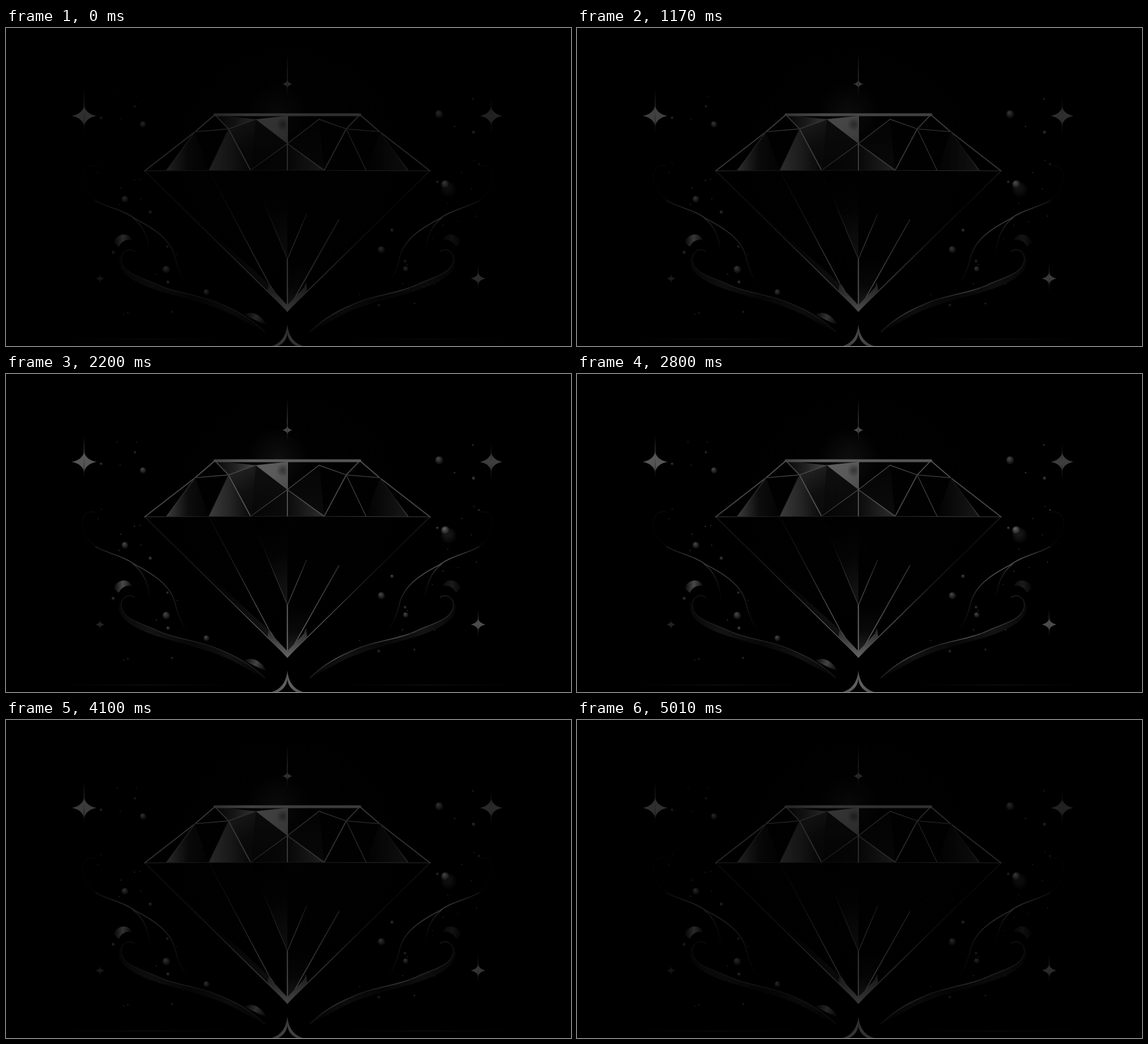
Animation of 998x561 px, one loop 5170 ms. Source, as an HTML page with a canvas:

```html
<!DOCTYPE html>
<html>
<head>
<meta charset="utf-8">
<style>
html, body { margin: 0; width: 100%; height: 100%; overflow: hidden; background: #000; }
canvas { display: block; }
</style>
</head>
<body>
<canvas id="stage" width="998" height="561"></canvas>
<script>
const W = 998, H = 561, AXIS = 497, LOOP = 5170, FADE = 5010;
const view = document.getElementById('stage').getContext('2d');
const art = document.createElement('canvas');
art.width = W;
art.height = H;
const c = art.getContext('2d');

// Gem corners as distance from the axis and height:
// lower-case letters lie left of the axis, upper-case letters right of it.
const corners = {
  a: [128, 153], b: [104, 178], c: [163, 183], d: [56, 161],
  e: [65, 251], f: [139, 251], g: [213, 251], t: [252, 252],
  o: [0, 155], h: [0, 204], p: [0, 251],
  k: [0, 408], m: [32, 452], n: [91, 338], r: [34, 328], q: [0, 499]
};

function corner(ch) {
  const key = ch.toLowerCase();
  const [dx, y] = corners[key];
  return [AXIS + (ch === key ? -dx : dx), y];
}

const gray = (v, a = 1) => `rgba(${v},${v},${v},${a})`;

function ramp([x1, y1], [x2, y2], tones) {
  const g = c.createLinearGradient(x1, y1, x2, y2);
  tones.forEach((v, i) => g.addColorStop(i / (tones.length - 1), gray(v)));
  return g;
}

function trace(names) {
  c.beginPath();
  for (const ch of names) c.lineTo(...corner(ch));
}

// Shades run from the first named corner towards the last
function facet(names, ...tones) {
  trace(names);
  c.closePath();
  c.fillStyle = ramp(corner(names[0]), corner(names.at(-1)), tones);
  c.fill();
}

function edge(names, width, ...tones) {
  trace(names);
  c.strokeStyle = ramp(corner(names[0]), corner(names.at(-1)), [...tones, tones.at(-1)]);
  c.lineWidth = width;
  c.stroke();
}

function glow(x, y, r, v, a) {
  const g = c.createRadialGradient(x, y, 0, x, y, r);
  g.addColorStop(0, gray(v, a));
  g.addColorStop(1, gray(v, 0));
  c.fillStyle = g;
  c.fillRect(x - r, y - r, r * 2, r * 2);
}

function mirrored(draw) {
  for (const right of [false, true]) {
    c.save();
    if (right) {
      c.translate(AXIS * 2, 0);
      c.scale(-1, 1);
    }
    draw(right);
    c.restore();
  }
}

function crown() {
  facet('gcf', 60, 14, 4);
  facet('fbe', 60, 38, 10);
  facet('dba', 74, 34, 8);
  facet('bde', 34, 16, 10);
  facet('dhe', 16, 8);
  facet('Ehe', 46, 12, 6);
  facet('DhE', 6, 12);
  facet('GCF', 24, 3);
  facet('doh', 96, 92, 78);
  glow(AXIS - 8, 170, 12, 20, 0.5);

  facet('aoA', 68, 98, 84);
  edge('aA', 5, 70, 98, 94, 88);
  for (const side of ['act', 'ACT']) edge(side, 1.8, 86, 74);
  edge('abe', 1.8, 74, 84);
  edge('ABE', 1.8, 86, 72);
  edge('cbd', 1.4, 56, 72);
  edge('DBC', 1.4, 70, 56);
  edge('gc', 1.5, 66, 44);
  edge('GC', 1.3, 66, 24);
  edge('BF', 1.3, 60, 66);
  edge('bf', 1, 34, 24);
  edge('ehD', 1.3, 48, 76);
  edge('hE', 1.6, 60, 80);
  edge('de', 1, 30, 16);
  edge('op', 2, 96, 80);
  edge('tpT', 1.2, 64, 34, 30, 34, 64);
}

function pavilion() {
  facet('tmq', 2, 4, 26);
  facet('kpe', 24, 5, 0);
  facet('qNk', 40, 10, 2);
  edge('tq', 1.3, 28, 24, 44, 92);
  edge('Tq', 1.3, 34, 16, 36, 92);
  edge('fmq', 1.4, 8, 32, 90);
  edge('ek', 1, 2, 8, 64);
  edge('rk'.replace('r', 'R'), 1.3, 34, 74);
  edge('Nq', 1.6, 50, 64, 90);
  edge('kq', 2.2, 84, 94);

  // Bright point of the gem
  c.fillStyle = ramp([AXIS, 450], [AXIS, 500], [40, 72, 102]);
  mirrored(() => {
    c.fill(new Path2D('M464 448L468 458L497 489V501L462 463Z'));
  });
}

function vines() {
  mirrored(right => {
    const lit = right ? 78 : 56;
    const stroke = (d, width, from, to, ...tones) => {
      c.strokeStyle = ramp(from, to, tones);
      c.lineWidth = width;
      c.stroke(new Path2D(d));
    };
    stroke('M158 244C143 239 133 252 135 266Q138 294 165 307', 1, [140, 240], [150, 307], 20, 4, 18);
    stroke('M158 305C187 319 207 321 229 337C266 356 294 376 300 410Q306 433 318 450',
      1.8, [158, 305], [318, 450], 24, lit, lit, 30, 3);
    stroke('M224 335Q250 354 254 396', 1.4, [224, 335], [254, 396], lit, 30, 3);

    const top = 'M227 394C215 386 202 396 204 411C208 434 240 440 264 451C300 469 345 470 384 489C420 504 440 520 457 536';
    c.fillStyle = ramp([205, 400], [457, 536], [8, 20, 8, 18, 5]);
    c.fill(new Path2D(top + 'Q428 522 400 506C360 486 310 476 268 463C224 449 196 430 200 408Q207 386 227 394Z'));
    stroke(top, right ? 1.8 : 1.2, [205, 400], [457, 536], 24, lit * 0.65, lit, 38, lit, 26);

    c.fillStyle = ramp([190, 375], [223, 375], right ? [5, 28, 12] : [6, 76, 10]);
    c.fill(new Path2D('M190 378C196 361 218 360 222 374Q207 371 199 386Z'));
    if (!right) {
      c.fillStyle = ramp([420, 505], [460, 522], [4, 70, 4]);
      c.fill(new Path2D('M420 505Q443 495 461 524Q444 518 420 505Z'));
    }
    c.fillStyle = ramp([113, 0], [385, 0], [3, 26, 3]);
    c.fillRect(113, 548, 272, 1);
  });
}

function star(x, y, w, up, down, v) {
  const arm = w * 0.8, pinch = w * 0.16;
  c.beginPath();
  c.moveTo(x, y - arm);
  for (const [sx, sy] of [[1, -1], [1, 1], [-1, 1], [-1, -1]]) {
    const flat = sx * sy < 0;
    c.quadraticCurveTo(x + sx * pinch, y + sy * pinch,
      x + (flat ? sx * w : 0), y + (flat ? 0 : sy * arm));
  }
  c.fillStyle = gray(v);
  c.fill();
  c.fillStyle = ramp([x, y - up], [x, y + down], [2, v, 2]);
  c.fillRect(x - 0.6, y - up, 1.2, up + down);
}

// The four arm ends are visited clockwise, starting from the top
function drawStar(x, y, w, up, down, v) {
  const arm = w * 0.8, pinch = w * 0.16;
  const ends = [[0, -arm], [w, 0], [0, arm], [-w, 0]];
  c.beginPath();
  c.moveTo(x, y - arm);
  ends.forEach(([ex, ey], i) => {
    const [nx, ny] = ends[(i + 1) % 4];
    c.quadraticCurveTo(x + Math.sign(ex + nx) * pinch, y + Math.sign(ey + ny) * pinch, x + nx, y + ny);
  });
  c.fillStyle = gray(v);
  c.fill();
  c.fillStyle = ramp([x, y - up], [x, y + down], [2, v, 2]);
  c.fillRect(x - 0.6, y - up, 1.2, up + down);
}

function sparkles() {
  drawStar(138, 155, 22, 46, 28, 88);
  drawStar(857, 155, 20, 32, 32, 62);
  drawStar(834, 442, 13, 27, 22, 78);
  drawStar(166, 442, 8, 10, 10, 36);
  drawStar(AXIS, 99, 9, 55, 24, 76);
  mirrored(() => {
    c.fillStyle = ramp([497, 523], [470, 561], [78, 98, 84]);
    c.fill(new Path2D('M497 523Q494 554 469 561H481Q496 553 497 538Z'));
  });
}

function bubble(x, y, r, v) {
  const g = c.createRadialGradient(x - r * 0.3, y - r * 0.5, 0, x, y, r);
  g.addColorStop(0, gray(v));
  g.addColorStop(0.5, gray(v * 0.6));
  g.addColorStop(1, gray(v * 0.1));
  c.fillStyle = g;
  c.beginPath();
  c.arc(x, y, r, 0, 7);
  c.fill();
}

function droplets() {
  bubble(782, 285, 14, 32);
  bubble(776, 276, 8, 106);
  const large = [[765, 152], [283, 426], [663, 391], [210, 302], [242, 170], [354, 466], [706, 425]];
  large.forEach(([x, y], i) => bubble(x, y, 7.5 - i * 0.4, 76));

  let seed = 11;
  const random = () => (seed = seed * 16807 % 2147483647) / 2147483647;
  for (let i = 0; i < 44; i++) {
    const y = 120 + random() * 385;
    const inner = y < 252 ? 265 : 265 - (y - 252) * 0.8;
    const x = AXIS + (i % 2 ? 1 : -1) * (inner + random() * (345 - inner));
    bubble(x, y, 1.2 + 2.6 * random() ** 3, 50 + random() * 35);
  }
}

function paint() {
  c.lineJoin = c.lineCap = 'round';
  glow(AXIS, 230, 320, 5, 0.6);
  glow(480, 150, 55, 40, 0.35);
  vines();
  pavilion();
  crown();
  sparkles();
  droplets();
}

function frame(now) {
  const t = Math.min(now % LOOP, FADE);
  const pulse = 0.5 - 0.5 * Math.cos(t / FADE * Math.PI * 2);
  view.globalAlpha = 1;
  view.fillStyle = '#000';
  view.fillRect(0, 0, W, H);
  view.globalAlpha = 0.54 + 0.46 * pulse;
  view.drawImage(art, 0, 0);
  requestAnimationFrame(frame);
}

paint();
requestAnimationFrame(frame);
</script>
</body>
</html>
```
